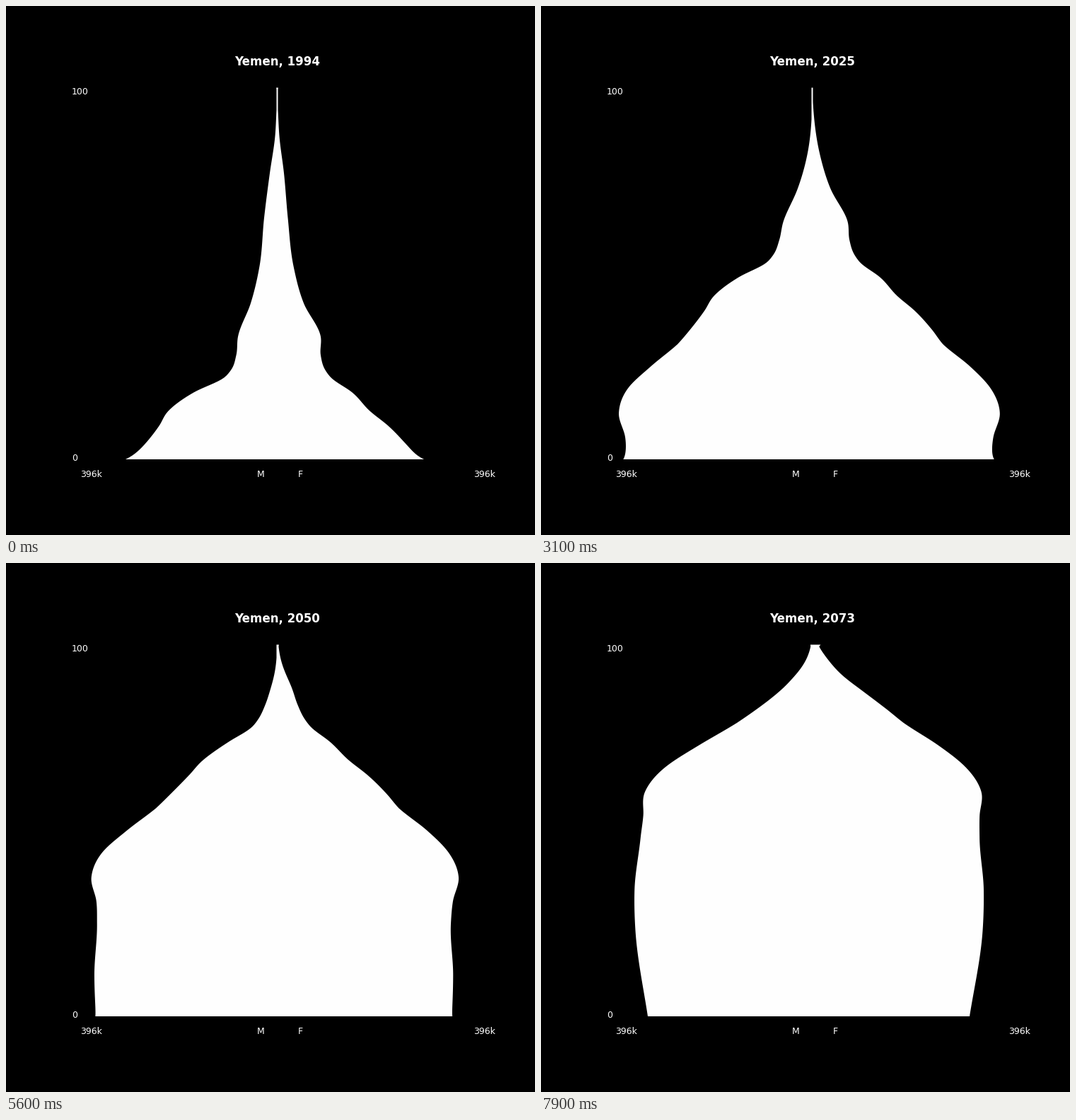
These frames come from a looping animation (748 by 748 pixels, 8 s). A matplotlib script:

```python
import numpy as np
import matplotlib.pyplot as plt
from matplotlib.animation import FuncAnimation

SIZE, DPI = 748, 100
FIRST, YEARS = 1994, 80
MID, BASE, TOP = 383.5, 641, 115.5
AGES = np.linspace(0, 100, 201)
ROWS = BASE - AGES * (BASE - TOP) / 100

# Key birth years: year, men, women (widths in px at birth or in the first year)
COHORTS = np.array([
    (1900, 1, 1), (1907, 3, 3), (1917, 10.5, 9.5), (1929, 18.5, 15),
    (1942, 25, 23), (1952, 37.5, 37.5), (1961, 55.5, 61.5), (1966, 58, 61.5),
    (1970, 65.5, 68), (1972, 75, 76), (1976, 118, 106), (1981, 154, 131),
    (1985, 167, 157), (1990, 187, 182), (1994, 205.5, 198.5), (2000, 240, 234),
    (2006, 269.5, 260.5), (2012.5, 278.5, 270), (2019, 266.5, 258),
    (2025, 262.5, 252.5), (2039, 261.5, 251.5), (2050, 256, 246.5),
    (2073, 232.5, 222.5)], float).T


def smooth(x, xs, vs):
    """Cubic Hermite curve through the points (xs, vs)."""
    m = np.gradient(vs, xs)
    x = np.clip(x, xs[0], xs[-1])
    i = np.clip(np.searchsorted(xs, x, side="right") - 1, 0, len(xs) - 2)
    h = xs[i + 1] - xs[i]
    u = (x - xs[i]) / h
    return ((1 + 2 * u) * (1 - u) ** 2 * vs[i] + u * (1 - u) ** 2 * h * m[i]
            + u * u * (3 - 2 * u) * vs[i + 1] + u * u * (u - 1) * h * m[i + 1])


def half(year, size, frailty):
    """Width by age: birth cohorts climb one row a year and thin out."""
    born = year - AGES
    since = np.maximum(born, FIRST)

    def ageing(t):
        # Mortality grows with age and eases over the decades
        return np.exp((t - born) / 11 - (t - FIRST) / 75)

    def leaving(t):
        return 0.0009 * t - 0.04 * np.exp((FIRST - t) / 12)

    loss = frailty * (ageing(year) - ageing(since)) + leaving(year) - leaving(since)
    width = smooth(born, COHORTS[0], size) * np.exp(-loss)
    width += 9 * max(0, (2058 - year) / 64) * np.exp(-AGES / 1.5)
    width[-1] *= 1.4  # the last row also holds everyone older
    return np.maximum(width, 1)


plt.rcParams["font.family"] = "DejaVu Sans"
fig = plt.figure(figsize=(SIZE / DPI, SIZE / DPI), dpi=DPI, facecolor="black")
ax = fig.add_axes([0, 0, 1, 1])
ax.set(xlim=(0, SIZE), ylim=(SIZE, 0))
ax.axis("off")


def label(x, y, text, ha="center", **kw):
    kw = {"size": 9, **kw}
    return ax.text(x, y, text, ha=ha, va="baseline", color="white", **kw)


label(92.8, 125, "100", ha="left")
label(92.8, 643, "0", ha="left")
for x, text in [(120.5, "396k"), (359.7, "M"), (416.3, "F"), (677, "396k")]:
    label(x, 666.3, text)
title = label(MID, 84, "", size=12, weight="bold")
shape, = ax.fill([0, 0, 0], [0, 0, 0], color="#fefefe", lw=0)


def draw(n):
    year = FIRST + n
    men = half(year, COHORTS[1], 12e-4)
    women = half(year, COHORTS[2], 7e-4)
    x = np.concatenate([MID - men, (MID + women)[::-1]])
    y = np.concatenate([ROWS, ROWS[::-1]])
    shape.set_xy(np.column_stack([x, y]))
    title.set_text(f"Yemen, {year}")
    return shape, title


anim = FuncAnimation(fig, draw, frames=YEARS, interval=100, repeat=True,
                     repeat_delay=0, blit=False)
plt.show()
```
